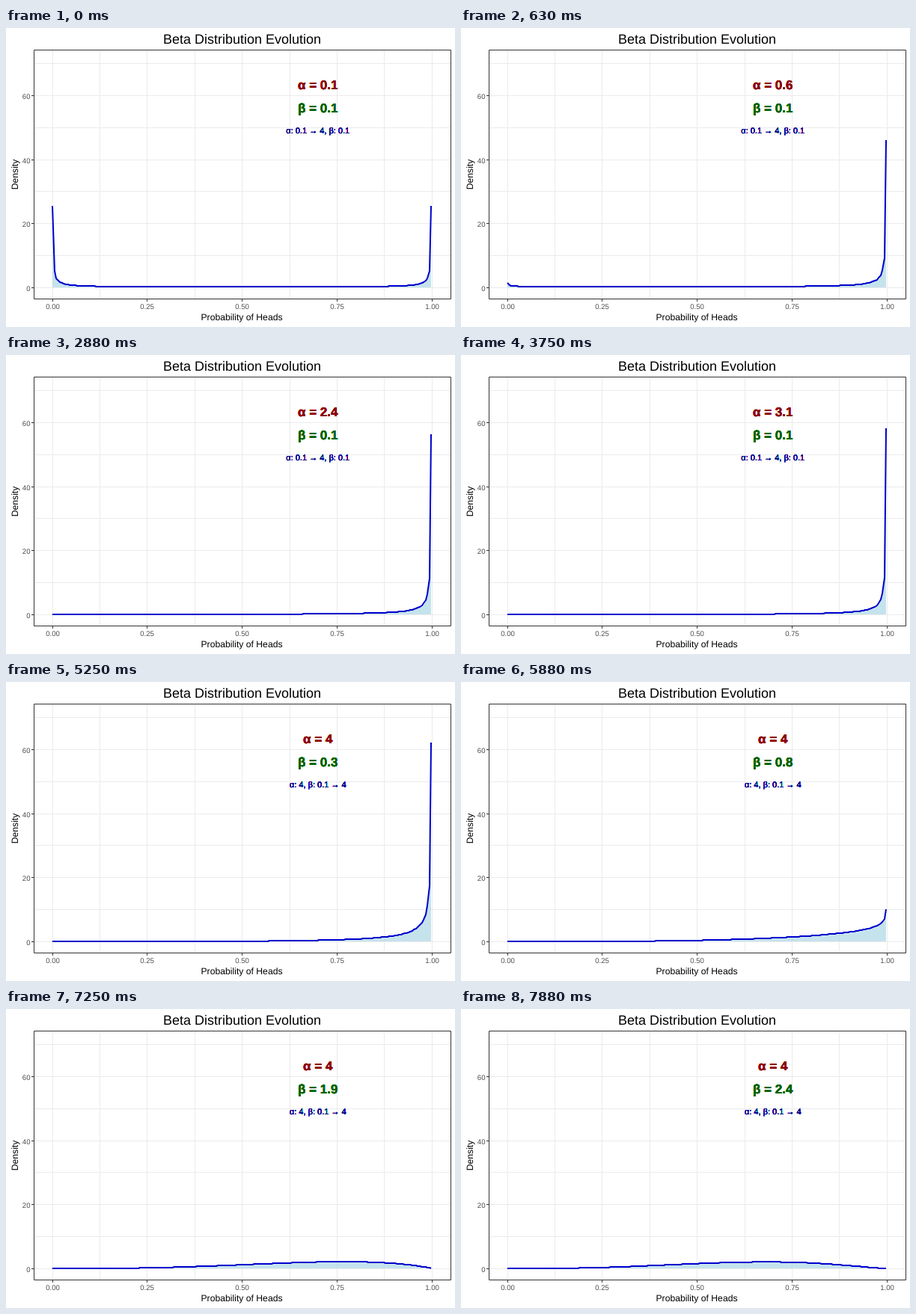
An HTML page with a canvas that plays this animation: 600 px wide and 400 px high, repeating every 8000 ms.

```html
<!DOCTYPE html>
<html lang="en">
<head>
<meta charset="utf-8">
<title>Beta Distribution Evolution</title>
<style>
  html, body { margin: 0; width: 100%; height: 100%; overflow: hidden; background: #fff; }
  canvas { display: block; }
</style>
</head>
<body>
<canvas id="plot" width="600" height="400"></canvas>
<script>
const ctx = document.getElementById('plot').getContext('2d');
const FONT = '"Liberation Sans", Arial, sans-serif';
const STEP = 125, STEPS = 64, POINTS = 200;

// Data to whole pixels
const px = p => Math.round(61.7 + 507.1 * p);
const py = d => Math.round(347.22 - 4.292 * d);

// Stirling series, shifted upwards for small arguments
function gamma(z) {
  if (z < 9) return gamma(z + 1) / z;
  return Math.sqrt(2 * Math.PI / z) * (z / Math.E) ** z * Math.exp(1 / (12 * z) - 1 / (360 * z ** 3));
}

function rect(color, x, y, w, h) {
  ctx.fillStyle = color;
  ctx.fillRect(x, y, w, h);
}

function text(str, x, y, size, color, align = 'center') {
  ctx.font = `${size}px ${FONT}`;
  ctx.textAlign = align;
  ctx.fillStyle = color;
  ctx.fillText(str, x, y);
}

// Heavy overprinted text, each colour channel shifted by a third of a pixel
function overprint(str, y, font, [r, g, b]) {
  ctx.save();
  ctx.font = `${font} ${FONT}`;
  ctx.textAlign = 'center';
  ctx.globalCompositeOperation = 'darken';
  const channels = [[r, 255, 255], [255, g, 255], [255, 255, b]];
  channels.forEach((rgb, i) => {
    ctx.fillStyle = `rgb(${rgb})`;
    for (let k = 0; k < 7; k++) ctx.fillText(str, 416.7 + (1 - i) / 3, y);
  });
  ctx.restore();
}

function drawAxes() {
  rect('#fff', 0, 0, 600, 400);
  for (let i = 0; i <= 8; i++) rect('#ebebeb', px(i / 8), 30, 1, 332);
  for (let d = 0; d <= 70; d += 10) rect('#ebebeb', 38, py(d), 556, 1);
  for (let p = 0; p <= 1; p += 0.25) {
    rect('#333', px(p), 363, 1, 3);
    text(p.toFixed(2), px(p) + 0.5, 376, 9.6, '#4d4d4d');
  }
  for (let d = 0; d <= 60; d += 20) {
    rect('#333', 34, py(d), 3, 1);
    text(d, 32.5, py(d) + 5, 9.6, '#4d4d4d', 'right');
  }
  text('Beta Distribution Evolution', 315.5, 21, 18, '#000');
  text('Probability of Heads', 315, 391, 12.2, '#000');
  ctx.save();
  ctx.translate(16, 196);
  ctx.rotate(-Math.PI / 2);
  text('Density', 0, 0, 12.2, '#000');
  ctx.restore();
}

function drawCurve(a, b) {
  const scale = gamma(a + b) / (gamma(a) * gamma(b));
  const line = new Path2D();
  for (let i = 0; i < POINTS; i++) {
    const p = 0.001 + 0.998 * i / (POINTS - 1);
    line.lineTo(px(p), py(scale * p ** (a - 1) * (1 - p) ** (b - 1)));
  }
  const area = new Path2D(line);
  area.lineTo(px(0.999), py(0));
  area.lineTo(px(0.001), py(0));
  ctx.fillStyle = 'rgba(173, 216, 230, 0.7)';
  ctx.fill(area);
  ctx.strokeStyle = '#0000cd';
  ctx.lineWidth = 2;
  ctx.lineJoin = 'round';
  ctx.stroke(line);
}

function draw(step) {
  const rising = step < 40;
  const a = rising ? (step + 1) / 10 : 4;
  const b = rising ? 0.1 : (step - 39) / 10;
  drawAxes();
  drawCurve(a, b);
  overprint(`α = ${a}`, 82, 'bold 17px', [139, 0, 0]);
  overprint(`β = ${b}`, 113, 'bold 17px', [0, 100, 0]);
  overprint(rising ? 'α: 0.1 → 4, β: 0.1' : 'α: 4, β: 0.1 → 4', 141, '11px', [0, 0, 139]);
  ctx.strokeStyle = '#333';
  ctx.lineWidth = 1;
  ctx.strokeRect(37.5, 29.5, 557, 333);
}

ctx.textRendering = 'geometricPrecision';
const start = performance.now();
function tick() {
  draw(Math.floor((performance.now() - start) / STEP) % STEPS);
  requestAnimationFrame(tick);
}
tick();
</script>
</body>
</html>
```
